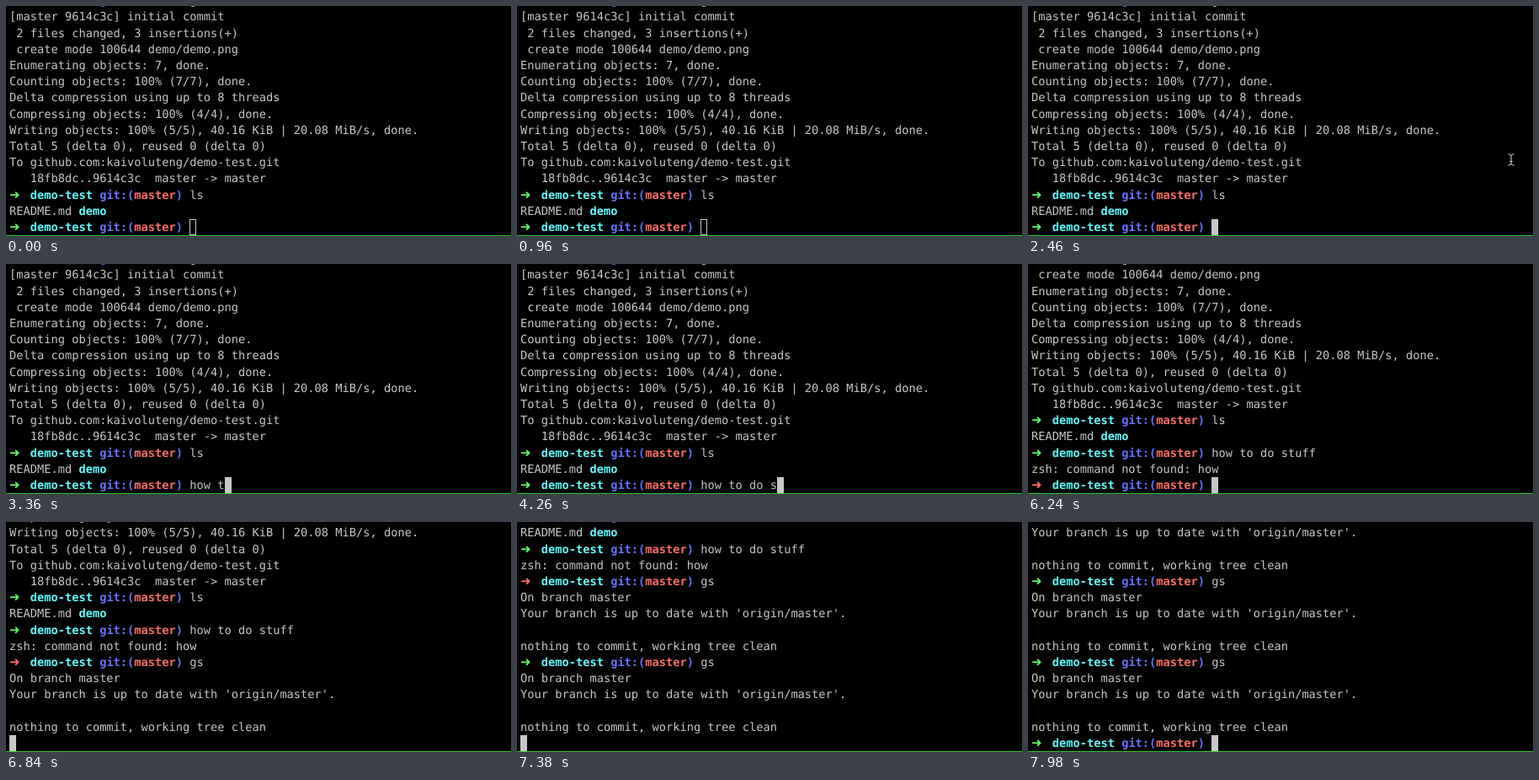
Recreate the animation shown at these times as an HTML page. Size 600 by 273 pixels, loop 8000 ms.

```html
<!DOCTYPE html>
<html lang="en">
<head>
<meta charset="utf-8">
<title>Terminal session</title>
<style>
  :root { --cell: 8.242px; --row: 19.23px; --left: 4px; }
  html, body { margin: 0; width: 100%; height: 100%; overflow: hidden; background: #000; }
  #stage { position: relative; width: 600px; height: 273px; overflow: hidden; background: #000; }
  #screen {
    position: absolute; left: var(--left); top: -14.93px; margin: 0;
    font: 13.69px/var(--row) "DejaVu Sans Mono", monospace;
    text-rendering: geometricPrecision; font-variant-ligatures: none;
    color: #c7c7c7; white-space: pre;
  }
  #screen div { height: var(--row); }
  .arrow {
    display: inline-block; width: calc(3 * var(--cell)); line-height: 0;
    font-family: "DejaVu Sans", sans-serif; font-size: 15px;
  }
  .green { color: #5ffa68; }
  .cyan { color: #60fdff; }
  .blue { color: #6871ff; }
  .red { color: #ff6e67; }
  #cursor {
    position: absolute; top: 253px; width: 8px; height: 19px;
    box-sizing: border-box; border: 1px solid #c7c7c7;
  }
  #cursor.focused { background: #c7c7c7; }
  #edge { position: absolute; left: 0; top: 272px; width: 100%; height: 1px; background: #28c828; }
  #pointer { position: absolute; left: 0; top: 0; width: 8px; height: 15px; overflow: visible; }
</style>
</head>
<body>
<div id="stage">
  <div id="screen"></div>
  <div id="cursor"></div>
  <div id="edge"></div>
  <svg id="pointer" viewBox="0 0 8 15" fill="none" stroke="#d8d8d8" stroke-width="1">
    <path d="M.5 .8Q3.5 .8 4 3V12Q3.5 14.2 .5 14.2M7.5 .8Q4.5 .8 4 3M4 12Q4.5 14.2 7.5 14.2M2.3 9.5H5.7"/>
  </svg>
</div>
<script>
const LOOP = 8000, CELL = 8.242, LEFT = 4, VISIBLE_ROWS = 15, PROMPT_COLS = 26;
const byId = id => document.getElementById(id);
const screenBox = byId('screen'), cursor = byId('cursor'), pointer = byId('pointer');

const bold = (color, text) => `<b class="${color}">${text}</b>`;
const prompt = (arrow = 'green') =>
  `<b class="arrow ${arrow}">➜</b>` + bold('cyan', 'demo-test') + ' ' +
  bold('blue', 'git:(') + bold('red', 'master') + bold('blue', ')') + ' ';

const history = [
  prompt() + 'gc -m "initial commit"',
  '[master 9614c3c] initial commit',
  ' 2 files changed, 3 insertions(+)',
  ' create mode 100644 demo/demo.png',
  'Enumerating objects: 7, done.',
  'Counting objects: 100% (7/7), done.',
  'Delta compression using up to 8 threads',
  'Compressing objects: 100% (4/4), done.',
  'Writing objects: 100% (5/5), 40.16 KiB | 20.08 MiB/s, done.',
  'Total 5 (delta 0), reused 0 (delta 0)',
  'To github.com:kaivoluteng/demo-test.git',
  '   18fb8dc..9614c3c  master -&gt; master',
  prompt() + 'ls',
  'README.md ' + bold('cyan', 'demo'),
  prompt()
];
const status = [
  'On branch master',
  "Your branch is up to date with 'origin/master'.",
  '',
  'nothing to commit, working tree clean'
];

// Each step turns the previous screen into the next one.
const steps = [{ at: 0, lines: history, col: PROMPT_COLS }];
function step(at, change) {
  const last = steps[steps.length - 1];
  const next = { at, lines: [...last.lines], col: last.col };
  change(next);
  steps.push(next);
}
function type(text, times) {
  [...text].forEach((char, i) => step(times[i], s => {
    s.lines[s.lines.length - 1] += char;
    s.col++;
  }));
}
function run(at, output, arrow) {
  step(at, s => { s.lines.push(''); s.col = 0; });
  step(at + 60, s => s.lines.splice(-1, 0, ...output));
  step(at + 120, s => { s.lines[s.lines.length - 1] = prompt(arrow); s.col = PROMPT_COLS; });
}

type('how to do stuff', [2820, 2940, 3060, 3180, 3360, 3480, 3600, 3780, 3900, 4020,
  4260, 4380, 4500, 4620, 4740]);
run(5220, ['zsh: command not found: how'], 'red');
type('gs', [6480, 6600]);
run(6780, status);
type('gs', [7020, 7140]);
run(7320, status);
type('gs', [7560, 7680]);
run(7800, status);

// Pointer path: time, x, y of its top left corner.
const path = [[1560, 600, 196], [1740, 589, 189], [1980, 574, 178], [2160, 570, 175], [2820, 570, 175]];
const FOCUS_AT = 2220;

function pointerAt(t) {
  const i = path.findIndex(p => p[0] > t);
  if (i < 1) return null;
  const [t0, x0, y0] = path[i - 1], [t1, x1, y1] = path[i];
  const k = (t - t0) / (t1 - t0);
  return [x0 + (x1 - x0) * k, y0 + (y1 - y0) * k];
}

let shown = null;
function draw(now) {
  const t = Math.floor((now % LOOP) / 60) * 60;
  const current = steps.findLast(s => s.at <= t);
  if (current !== shown) {
    shown = current;
    screenBox.innerHTML = current.lines.slice(-VISIBLE_ROWS).map(l => `<div>${l}</div>`).join('');
    cursor.style.left = Math.round(LEFT + current.col * CELL) + 'px';
  }
  cursor.className = t >= FOCUS_AT ? 'focused' : '';
  const spot = pointerAt(t);
  pointer.style.display = spot ? 'block' : 'none';
  if (spot) pointer.style.transform = `translate(${spot[0]}px, ${spot[1]}px)`;
}

const start = performance.now();
function tick() {
  draw(performance.now() - start);
  requestAnimationFrame(tick);
}
tick();
</script>
</body>
</html>
```
